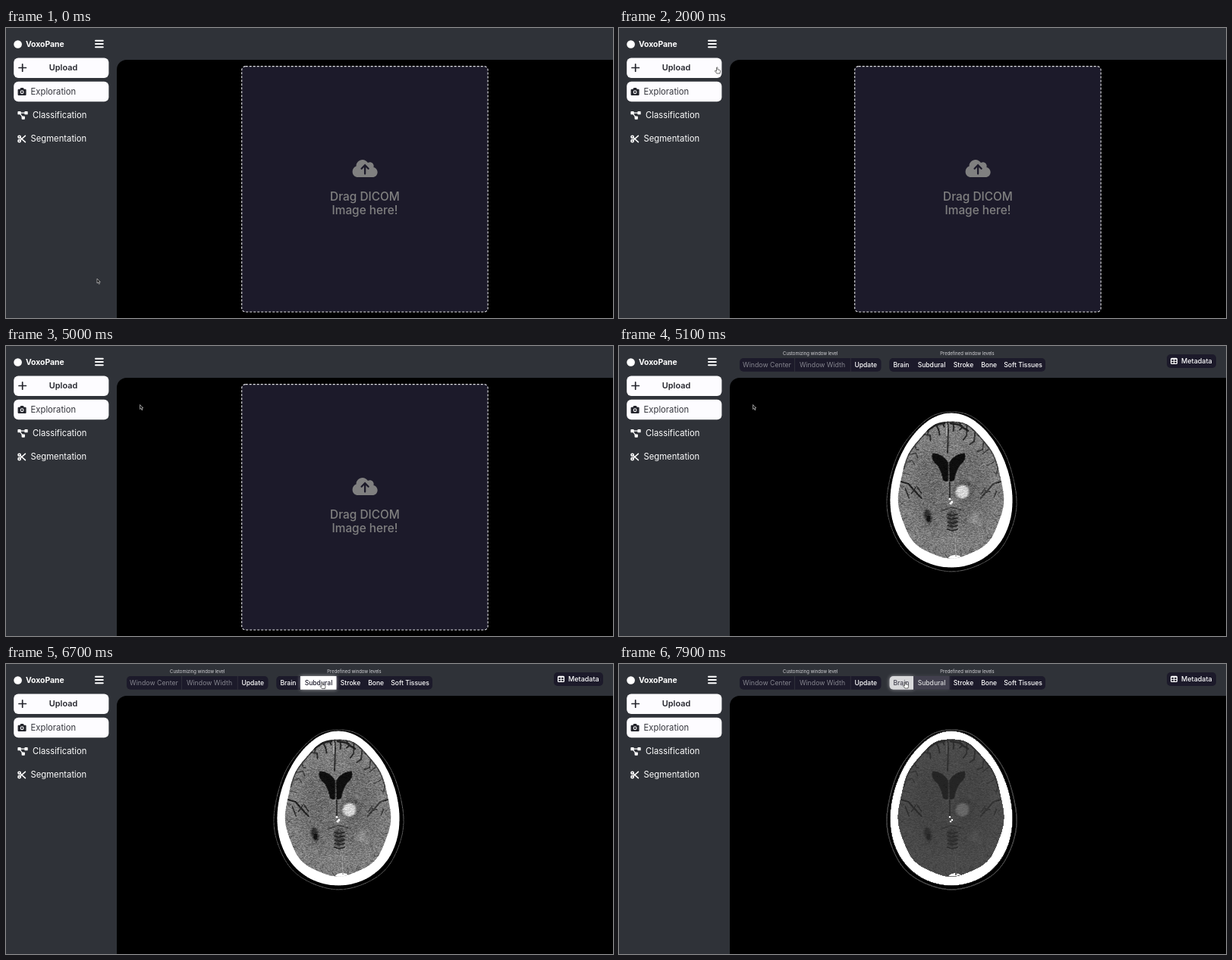
Recreate the animation shown at these times as an HTML page with a canvas. Size 800 px wide and 383 px high, loop 8 s.

```html
<!DOCTYPE html>
<html lang="en">
<head>
<meta charset="utf-8">
<title>Scan viewer</title>
<style>
  html, body { margin: 0; width: 100%; height: 100%; overflow: hidden; background: #2f3238; }
  #stage { position: absolute; left: 0; top: 0; width: 800px; height: 383px; overflow: hidden; }
  svg, canvas { position: absolute; left: 0; top: 0; }
  canvas { left: 340px; top: 78px; }
  text { font-family: Inter, "Open Sans", sans-serif; fill: #fff; }
  .nav { font-size: 11.25px; }
  .bar { font-size: 8.55px; font-weight: 500; text-anchor: middle; }
  .dim { fill: #85858e; font-weight: 400; font-size: 8.75px; }
  .cap { font-size: 5.9px; fill: #d4d4d8; text-anchor: middle; }
  .drag { font-size: 15.4px; font-weight: 500; fill: #808080; text-anchor: middle; }
  .line { fill: none; stroke: #fff; stroke-linecap: round; }
</style>
</head>
<body>
<div id="stage">
<svg width="800" height="383" viewBox="0 0 800 383">
  <rect width="800" height="383" fill="#2f3238"/>
  <path d="M146 383V55a13 13 0 0 1 13-13H800V383z" fill="#000"/>

  <circle cx="15.6" cy="21.5" r="5.3" fill="#fff"/>
  <text x="26" y="25" font-size="10.4" font-weight="700">VoxoPane</text>
  <path class="line" d="M118 16.8h9.8M118 21h9.800M118 25.2h9.8" stroke-width="2"/>

  <g fill="#fdfcff">
    <rect x="10.2" y="39.5" width="125.2" height="26.5" rx="6"/>
    <rect x="10.2" y="70.7" width="125.2" height="26.5" rx="6"/>
  </g>
  <path class="line" d="M17 52.5h9.4M21.7 47.8v9.4" stroke-width="1.7" style="stroke:#24252c"/>
  <text x="75.5" y="56.4" font-size="10.9" font-weight="600" text-anchor="middle" style="fill:#24252c">Upload</text>

  <path d="M16.6 80.7h1.9l.8-1.7h3.6l.8 1.7h1.9q1 0 1 1v6.2q0 1-1 1h-9q-1 0-1-1v-6.2q0-1 1-1z" fill="#24252c"/>
  <circle cx="21.1" cy="84.7" r="1.9" fill="none" stroke="#fdfcff" stroke-width="1.1"/>
  <text class="nav" x="32.6" y="87.8" style="fill:#34353c">Exploration</text>

  <g fill="#fff">
    <rect x="15.4" y="110" width="4.3" height="4.3" rx=".9"/>
    <rect x="24.4" y="110" width="4.3" height="4.3" rx=".9"/>
    <rect x="20.6" y="116.4" width="4.3" height="4.3" rx=".9"/>
  </g>
  <path class="line" d="M19 112.1h6M18.6 113.3l3 4" stroke-width="1.1"/>
  <text class="nav" x="35" y="119">Classification</text>

  <g class="line" stroke-width="1.6">
    <circle cx="17.6" cy="143.8" r="1.6"/>
    <circle cx="17.6" cy="149.2" r="1.6"/>
    <path d="M19 145l6.4 5.6M19 148l6.4-5.6"/>
  </g>
  <text class="nav" x="32.6" y="150.2">Segmentation</text>

  <g id="drop">
    <rect x="310.7" y="50.6" width="324.4" height="324.4" rx="5" fill="#1c1a2a" stroke="#e6e6ea" stroke-width="1.1" stroke-dasharray="3 2"/>
    <path transform="translate(456.6 172.3) scale(.0516)" fill="#808080" d="M538 227c4-11 6-23 6-35 0-53-43-96-96-96-20 0-38 6-53 16C367 64 315 32 256 32c-88 0-160 72-160 160v8C40 220 0 273 0 336c0 80 64 144 144 144h368c71 0 128-57 128-128 0-62-44-114-102-125z"/>
    <path class="line" d="M473.1 192.5v-11M468.6 185.8l4.5-4.6 4.5 4.6" stroke-width="2.3" style="stroke:#1c1a2a"/>
    <text class="drag" x="473" y="228">Drag DICOM</text>
    <text class="drag" x="473" y="245.6">Image here!</text>
  </g>

  <g id="tools">
    <text class="cap" x="252.3" y="11.6">Customizing window level</text>
    <text class="cap" x="459" y="11.6">Predefined window levels</text>
    <g fill="#1c1a2a">
      <rect x="159" y="16" width="186.5" height="17.8" rx="5"/>
      <rect x="356.5" y="16" width="205.5" height="17.8" rx="5"/>
      <rect x="722" y="11" width="65" height="18" rx="5"/>
    </g>
    <path d="M231.5 16v17.8M305.3 16v17.8" stroke="#34343e" stroke-width=".8"/>
    <text class="bar dim" x="195" y="28.2">Window Center</text>
    <text class="bar dim" x="268" y="28.2">Window Width</text>
    <text class="bar" x="325.2" y="28.2">Update</text>
    <path id="brainBg" d="M361.5 16H388v17.8h-26.5a5 5 0 0 1-5-5V21a5 5 0 0 1 5-5z"/>
    <path id="subBg" d="M388 16h47.5v17.8H388z"/>
    <text id="brainTx" class="bar" x="372" y="28.2">Brain</text>
    <text id="subTx" class="bar" x="412" y="28.2">Subdural</text>
    <text class="bar" x="454" y="28.2">Stroke</text>
    <text class="bar" x="487.6" y="28.2">Bone</text>
    <text class="bar" x="532.6" y="28.2">Soft Tissues</text>
    <rect x="727.6" y="16.4" width="7.8" height="7" rx="1" fill="none" stroke="#fff" stroke-width="1.3"/>
    <path d="M727.6 17.3h7.8M727.6 20.3h7.8M731.5 17v6.4" stroke="#fff"/>
    <text class="bar" x="761.4" y="23.2" style="font-size:9px">Metadata</text>
  </g>

  <path id="arrow" d="M0 0v6l1.4-1.2 1.1 2.4 1-.5-1.1-2.3h1.9z" fill="#111" stroke="#c8c8c8" stroke-width=".7"/>
  <path id="hand" d="M0 .7q.7-1 1.4 0v2.6l2.8.7q1 .3.8 1.4L4.5 8.5H.4L-2 5.6q-.2-1.2 1-.8l1 .9z" fill="#fff" stroke="#333" stroke-width=".7"/>
</svg>
<canvas id="soft" width="190" height="224"></canvas>
<canvas id="wide" width="190" height="224"></canvas>
</div>
<script>
const $ = id => document.getElementById(id);
const LOOP = 8000, STEP = 100, OPEN = 5100, REWINDOW = 7600;
const ENTER = 6060, SWITCH = 7678, FADE = 300;

const home = { x: 120, y: 331 };
const moves = [
  { at: 0, ms: 1000, x: 128.5, y: 51.5 },
  { at: 2600, ms: 600, x: 176.5, y: 77.5 },
  { at: 5500, ms: 700, x: 412.5, y: 23.5 },
  { at: 6300, ms: 400, x: 416, y: 24 },
  { at: 7550, ms: 300, x: 376.5, y: 23.5 }
];

const smooth = x => { x = Math.min(1, Math.max(0, x)); return x * x * (3 - 2 * x); };

function pointer(t) {
  return moves.reduce((p, m) => {
    const k = smooth((t - m.at) / m.ms);
    return { x: p.x + (m.x - p.x) * k, y: p.y + (m.y - p.y) * k };
  }, home);
}

function lit(name, k) {
  const mix = (a, b) => `rgb(${a.map((v, i) => Math.round(v + (b[i] - v) * k))})`;
  const dark = [28, 26, 42], white = [255, 255, 255];
  $(name + 'Bg').style.fill = mix(dark, white);
  $(name + 'Bg').style.filter = k ? `drop-shadow(0 0 2.5px rgba(255,255,255,${k * 0.6}))` : 'none';
  $(name + 'Tx').style.fill = mix(white, dark);
}

function render(t) {
  const open = t >= OPEN;
  const show = (id, on) => { $(id).style.visibility = on ? 'visible' : 'hidden'; };
  show('drop', !open);
  show('tools', open);
  show('soft', open && t < REWINDOW);
  show('wide', t >= REWINDOW);
  const swap = smooth((t - SWITCH) / FADE);
  lit('sub', smooth((t - ENTER) / FADE) * (1 - swap));
  lit('brain', swap);
  const { x, y } = pointer(t);
  const overNav = x < 135 && y > 40 && y < 159;
  const overBar = x > 356 && y < 34;
  for (const id of ['arrow', 'hand']) $(id).setAttribute('transform', `translate(${x} ${y})`);
  show('arrow', !overNav && !overBar);
  show('hand', overNav || overBar);
}

function seeded(seed) {
  return () => (seed = (seed * 16807) % 2147483647) / 2147483647;
}

// Egg outline, narrower at the top; wave adds a slight ripple.
function egg({ x, y, rx, ry, taper, wave = 0 }, a, inset = 0) {
  const r = wave * Math.sin(9 * a) - inset;
  return [x + (rx + r) * Math.cos(a) * (1 + taper * Math.sin(a)), y + (ry + r) * Math.sin(a)];
}
const scalp = { x: 438.5, y: 192, rx: 84.5, ry: 105.5, taper: 0.13, wave: 0.4 };
const skull = { x: 438, y: 190.5, rx: 79.8, ry: 102, taper: 0.14 };
const brain = { x: 437.5, y: 189.5, rx: 68.5, ry: 90.5, taper: 0.12, wave: 0.8 };

function drawScan(id, wide) {
  const cv = $(id), c = cv.getContext('2d', { willReadFrequently: true });
  const rnd = seeded(91);
  const gray = v => `rgb(${v},${v},${v})`;
  const trace = (shape, from = 0, to = 2 * Math.PI) => {
    c.beginPath();
    for (let i = 0; i <= 120; i++) c.lineTo(...egg(shape, from + (to - from) * i / 120));
  };
  const fill = (shape, v) => { trace(shape); c.fillStyle = gray(v); c.fill(); };
  const blob = (x, y, rx, ry, v, blur = 0.6, turn = 0) => {
    c.filter = `blur(${blur}px)`;
    c.fillStyle = gray(v);
    c.beginPath();
    c.ellipse(x, y, rx, ry, turn, 0, 7);
    c.fill();
    c.filter = 'none';
  };
  const stroke = (v, w) => {
    c.filter = 'blur(.5px)';
    c.strokeStyle = gray(v);
    c.lineWidth = w;
    c.stroke();
    c.filter = 'none';
  };
  const line = (pts, v, w) => {
    c.beginPath();
    pts.forEach(p => c.lineTo(...p));
    stroke(v, w);
  };
  c.fillStyle = '#000';
  c.fillRect(0, 0, cv.width, cv.height);
  c.translate(-340, -78);
  c.lineCap = c.lineJoin = 'round';

  trace(scalp);
  c.strokeStyle = gray(wide ? 165 : 105);
  c.lineWidth = 0.8;
  c.stroke();
  fill(skull, 255);
  fill(brain, 126);
  c.save();
  trace(brain);
  c.clip();
  for (const s of [-1, 1]) blob(438 + s * 25, 190, 26, 56, 110, 7);
  blob(443, 281, 9, 5, 255);

  // fluid and folds under the bone, deepest at the front
  trace(brain, -0.9 * Math.PI, -0.1 * Math.PI);
  stroke(62, 3);
  for (let i = 0; i < 36; i++) {
    const a = 2 * Math.PI * (i + rnd() * 0.6) / 36;
    const front = Math.max(0, -Math.sin(a));
    const len = 5 + rnd() * (5 + 12 * front), bend = (rnd() - 0.5) * 0.2;
    line([egg(brain, a), egg(brain, a + bend, len * 0.6), egg(brain, a + bend / 2, len)], 88 - 48 * front, 1 + front);
  }

  for (const s of [-1, 1]) {
    // frontal pole and branching side fissure
    line([[433 + s * 4, 102], [433 + s * 15, 104], [433 + s * 27, 112]], 32, 2.6);
    const v = s < 0 ? 32 : 55, at = (u, y) => [437.5 + s * u, y];
    line([at(66, 179), at(56, 182), at(49, 190), at(39, 201)], v, 2);
    for (const u of [60, 52, 45]) line([at(u, 196 - rnd() * 12), at(u - 3 - rnd() * 5, 186 + rnd() * 16)], v + 10, 1.6);

    // front horn of the ventricle
    const m = 434.5 + s, q = (dx, y, ex, ey) => c.quadraticCurveTo(m + s * dx, y, m + s * ex, ey);
    c.beginPath();
    c.moveTo(m, 154);
    q(7, 142, 20, 142);
    q(23, 150, 13, 158);
    q(8, 166, 6, 177);
    q(3, 180, 0, 178);
    c.closePath();
    c.fillStyle = gray(14);
    c.fill();
    stroke(22, 0.8);
  }

  // midline
  line([[433, 99], [434, 112], [433, 141]], 45, 2);
  line([[432, 104], [432, 118]], 190, 1.2);
  line([[434.5, 157], [435, 179]], 78, 1.1);
  line([[436, 180], [436, 201]], 40, 1.8);
  line([[443, 246], [444, 278]], 150, 1.2);

  // rear horns and cistern
  blob(407, 225, 4.5, 9.5, 45, 1.3, -0.25);
  blob(408, 228, 2.4, 4, 20);
  blob(469, 229, 8, 10, 138, 3, 0.4);
  line([[424, 218], [438, 213], [454, 217]], 70, 2);
  blob(439, 229, 7, 13, 75, 1.5);
  for (let y = 222; y < 243; y += 5) line([[433, y], [439, y + 2], [446, y]], 35, 1.6);

  // bright focus with darker rim, calcified specks
  blob(455, 191, 13, 13, 88, 2.5);
  blob(452.5, 192.5, 9, 9, 212, 1);
  for (const [x, y] of [[436, 202], [438.8, 206], [437, 208]]) blob(x, y, 1.6, 1.5, 255, 0.2);
  c.restore();

  // grain, then the window level
  const img = c.getImageData(0, 0, cv.width, cv.height), d = img.data;
  let last = 0;
  for (let i = 0; i < d.length; i += 4) {
    const n = rnd() + rnd() - 1;
    let v = d[i];
    if (v > 8 && v < 240) {
      v += (n + last * 0.5) * Math.min(32, v * 0.4);
      if (wide) v = Math.min(1, v / 10) * (32 + v * 0.33);
    }
    last = n;
    d[i] = d[i + 1] = d[i + 2] = v;
  }
  c.putImageData(img, 0, 0);
}

drawScan('soft', false);
drawScan('wide', true);

const start = performance.now();
function tick(now) {
  const t = Math.max(0, now - start) % LOOP;
  render(Math.floor(t / STEP) * STEP);
  requestAnimationFrame(tick);
}
render(0);
requestAnimationFrame(tick);
</script>
</body>
</html>
```
